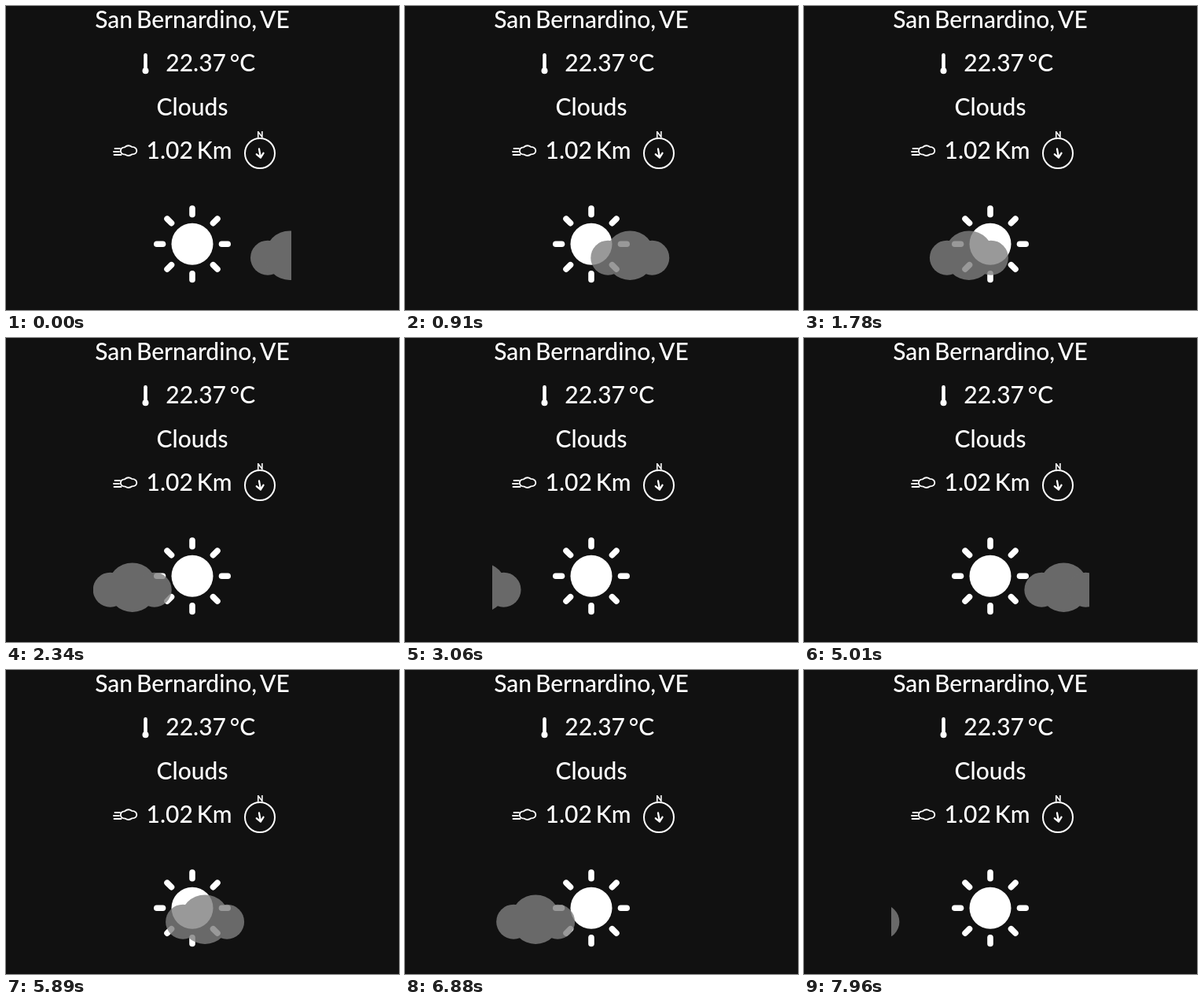
An HTML page that plays this animation: 500x386 px, repeating every 7990 ms.

```html
<!DOCTYPE html>
<html lang="en">
<head>
<meta charset="utf-8">
<title>Weather</title>
<style>
  html, body { margin: 0; width: 100%; height: 100%; overflow: hidden; background: #111; }
  svg { display: block; width: 500px; height: 386px; }
  text { font: 500 30px Lato, sans-serif; word-spacing: -2.7px; fill: #fff; }
  .mid { text-anchor: middle; }
  .north { font-size: 10.5px; font-weight: 900; }
  .line { fill: none; stroke: #fff; stroke-linecap: round; stroke-linejoin: round; }
</style>
</head>
<body>
<svg viewBox="0 0 500 386">
  <clipPath id="panel"><rect x="111" y="240" width="252" height="146"/></clipPath>

  <text class="mid" x="237" y="28">San Bernardino, VE</text>

  <g id="thermometer">
    <path class="line" stroke-width="4.6" d="M177.5 62.3V81"/>
    <circle cx="177.5" cy="82.3" r="4" fill="#fff"/>
  </g>
  <text x="203.3" y="83">22.37 °C</text>

  <text class="mid" x="237" y="139">Clouds</text>

  <g id="wind" class="line" stroke-width="1.8">
    <path d="M138.5 181H145M137 185H144M137.5 189H146.5"/>
    <path d="M145.8 184Q146 179.5 151 179.3Q155.5 175.5 160 178.8Q166.3 179 166.3 184Q166 188.3 160.5 188.3Q156 191.5 151.5 188.6Q146 188.5 145.8 184Z"/>
  </g>
  <text x="178.6" y="194">1.02 Km</text>

  <g id="compass">
    <text class="mid north" x="323.3" y="166.7">N</text>
    <circle class="line" cx="323" cy="187" r="19" stroke-width="2"/>
    <path class="line" stroke-width="2.3" d="M322 181.5L324 192.5M318.8 188.3L324 192.5L327.5 186.8"/>
  </g>

  <g id="sun" transform="translate(237 302.2)">
    <circle r="26.5" fill="#fff"/>
  </g>

  <g clip-path="url(#panel)">
    <g id="cloud" fill="#808080" opacity=".8">
      <circle cx="22" cy="319.7" r="22"/>
      <circle cx="50" cy="316.7" r="31.3"/>
      <circle cx="78" cy="319.7" r="22"/>
    </g>
  </g>
</svg>
<script>
  const LOOP = 7990;
  const SPEED = 0.0878; // px per ms, leftwards
  const SECOND_PASS = 4030;

  const sun = document.getElementById('sun');
  for (let angle = 0; angle < 360; angle += 45) {
    const ray = document.createElementNS(sun.namespaceURI, 'path');
    ray.setAttribute('class', 'line');
    ray.setAttribute('stroke-width', 7.6);
    ray.setAttribute('d', 'M37.5 0H45.2');
    ray.setAttribute('transform', `rotate(${angle})`);
    sun.append(ray);
  }

  // The cloud crosses twice per loop; the first crossing is already under way.
  function cloudLeft(time) {
    return time < SECOND_PASS
      ? 311 - SPEED * Math.max(0, time - 60)
      : 366.5 - SPEED * (time - SECOND_PASS);
  }

  const cloud = document.getElementById('cloud');
  function draw() {
    const x = cloudLeft(performance.now() % LOOP);
    cloud.setAttribute('transform', `translate(${x} 0)`);
    requestAnimationFrame(draw);
  }
  draw();
</script>
</body>
</html>
```
